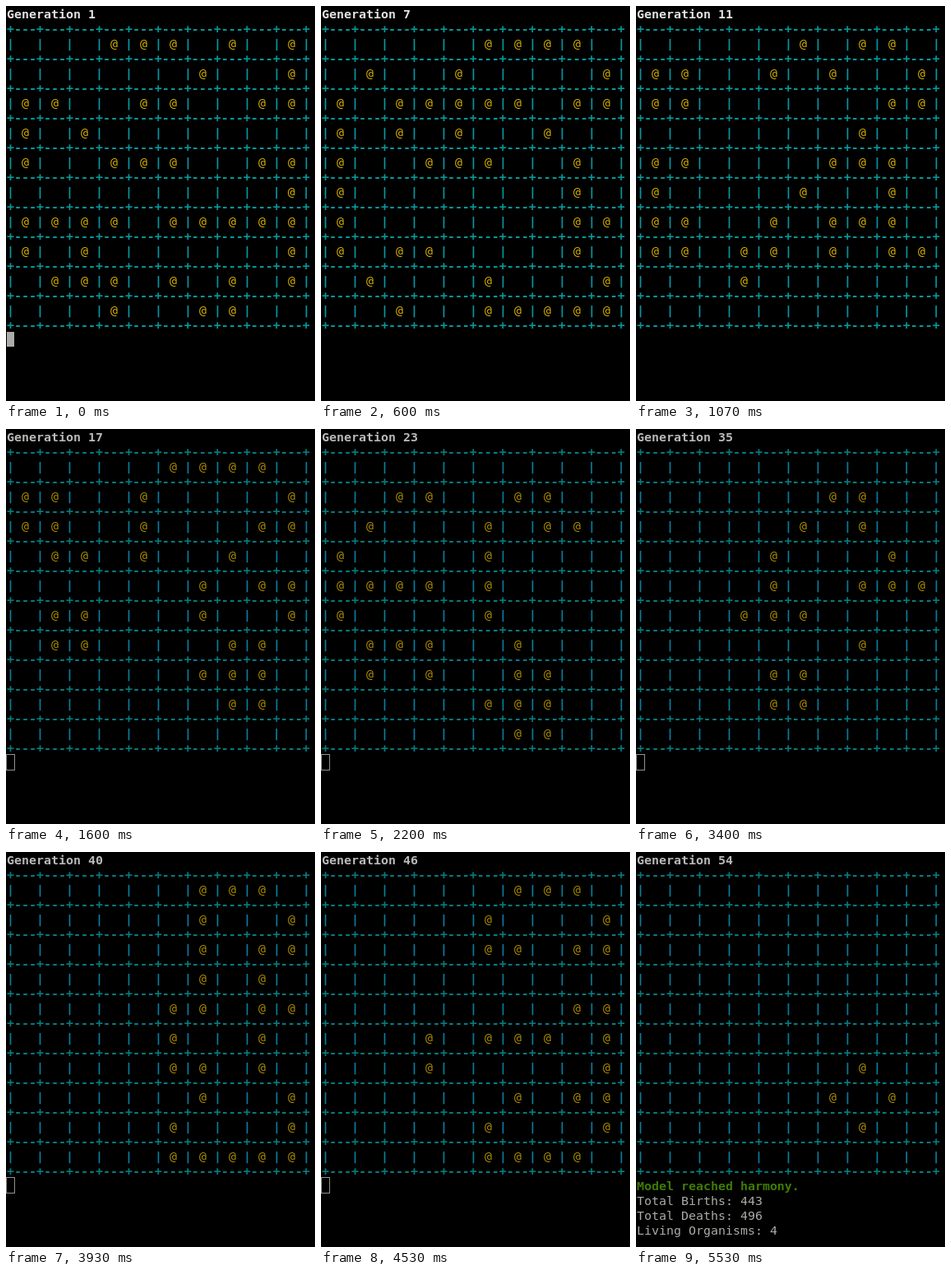
Animation, 376 px wide and 480 px high, one loop 7.87 s. Source, as an HTML page:

```html
<!DOCTYPE html>
<html lang="en">
<head>
<meta charset="utf-8">
<title>Life in a terminal</title>
<style>
  html, body { margin: 0; width: 100%; height: 100%; overflow: hidden; background: #000; }
  #term {
    --title: #e2e2e0; --grid: #06989a; --bar: #0698a4; --cell: #d6b000;
    position: relative; width: 376px; height: 480px; overflow: hidden; background: #000;
  }
  #term.idle { --title: #b9bab7; --grid: #057c80; --bar: #077ea0; --cell: #ac8e00; }
  pre {
    position: absolute; left: 1px; top: 1px; margin: 0; color: var(--grid);
    font: bold 14.95px/18px "DejaVu Sans Mono", "Liberation Mono", monospace;
  }
  b { color: var(--title); }
  i { font-style: normal; color: var(--bar); }
  u { text-decoration: none; font-weight: normal; color: var(--cell); }
  .ok { color: #3e7b05; }
  .sum { font-weight: normal; color: #a9aca6; }
  #cursor { position: absolute; left: 1px; top: 396px; width: 9px; height: 18px; background: #aaaca8; }
  .idle #cursor {
    left: 0; top: 395px; width: 11px; height: 20px; box-sizing: border-box;
    background: none; border: 1px solid #8f918c;
  }
</style>
</head>
<body>
<div id="term"><pre id="out"></pre><div id="cursor"></div></div>
<script>
const LOOP = 7870, LAST = 54, SIZE = 10;
const CURSOR_OFF = 70, BLUR = 1470, DONE = 5400;

// Columns of the living cells, row by row
const seed = ['34579', '69', '014589', '02', '034589', '9', '012356789', '029', '123579', '367'];

const term = document.getElementById('term');
const out = document.getElementById('out');
const cursor = document.getElementById('cursor');

function neighbours(grid, r, c) {
  let n = -grid[r][c];
  for (let y = r - 1; y <= r + 1; y++)
    for (let x = c - 1; x <= c + 1; x++) n += grid[y]?.[x] || 0;
  return n;
}

// Cells change in place, so later cells see the new state of earlier ones
function step(old) {
  const grid = old.map(row => row.slice());
  for (let r = 0; r < SIZE; r++)
    for (let c = 0; c < SIZE; c++) {
      const n = neighbours(grid, r, c);
      grid[r][c] = n === 3 || (n === 2 && grid[r][c]) ? 1 : 0;
    }
  return grid;
}

const history = [seed.map(row => Array.from({ length: SIZE }, (_, c) => +row.includes(c)))];
while (history.length < LAST) history.push(step(history[history.length - 1]));

const rule = '+---'.repeat(SIZE) + '+\n';
const bar = '<i>|</i>';
const summary = '<b class="ok">Model reached harmony.</b>\n<span class="sum">' +
  'Total Births: 443\nTotal Deaths: 496\nLiving Organisms: 4</span>';

function screen(gen, done) {
  const rows = history[gen - 1].map(row =>
    bar + row.map(on => (on ? ' <u>@</u> ' : '   ') + bar).join('') + '\n');
  return `<b>Generation ${gen}</b>\n` + rule + rows.join(rule) + rule + (done ? summary : '');
}

let shown = '';
function draw(t) {
  const gen = Math.min(LAST, 1 + 2 * Math.floor(t / 200) + (t % 200 >= 130 ? 1 : 0));
  const done = t >= DONE;
  const key = gen + '/' + done;
  if (key !== shown) {
    out.innerHTML = screen(gen, done);
    shown = key;
  }
  term.className = t >= BLUR ? 'idle' : '';
  cursor.hidden = done || (t >= CURSOR_OFF && t < BLUR);
}

const start = performance.now();
function tick() {
  draw((performance.now() - start) % LOOP);
  requestAnimationFrame(tick);
}
tick();
</script>
</body>
</html>
```
